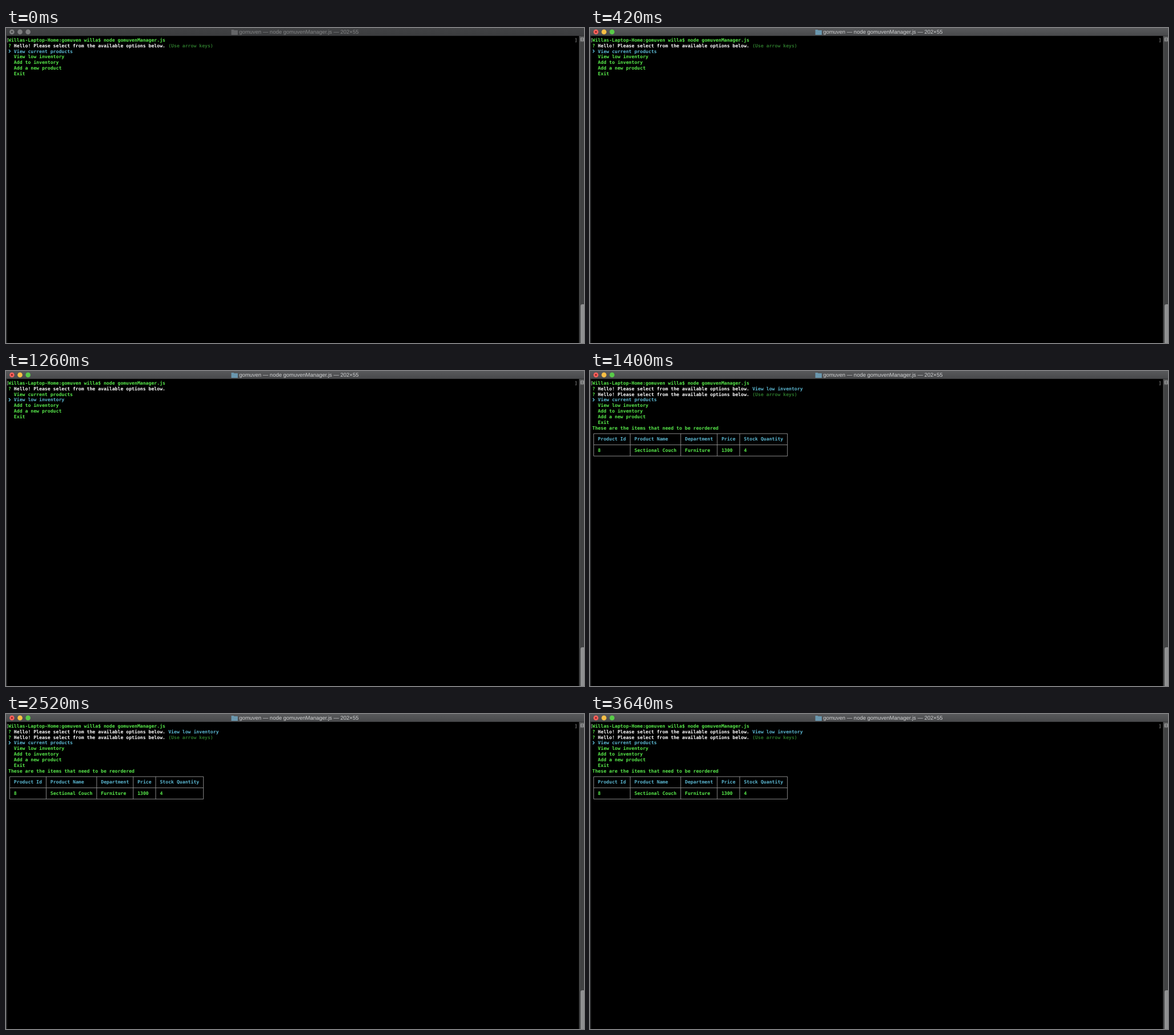
These frames come from a looping animation (1012 by 553 pixels, 3850 ms). An HTML page:

```html
<!DOCTYPE html>
<html lang="en">
<head>
<meta charset="utf-8">
<title>Terminal</title>
<style>
  html, body { margin: 0; width: 100%; height: 100%; overflow: hidden; background: #000; }
  svg {
    display: block; width: 1012px; height: 553px; text-rendering: geometricPrecision;
    --top: #414244; --bottom: #3b3c3e; --title: #858687; --folder: #646567;
    --close: #7d7e7f; --min: #7d7e7f; --zoom: #7d7e7f; --dot: #38393a;
  }
  svg.active {
    --top: #58595b; --bottom: #48494b; --title: #d2d3d4; --folder: #6a97ae;
    --close: #f7605a; --min: #f8bf45; --zoom: #58cb48; --dot: #7c1210;
  }
  #screen text { font: bold 8.166px "DejaVu Sans Mono", monospace; white-space: pre; }
  #title { font: 9.48px "Liberation Sans", Arial, sans-serif; fill: var(--title); }
  .green { fill: #58ea4b; }
  .cyan { fill: #5cb8d2; }
  .white { fill: #fff; }
  .dim { fill: #2b742a; }
  .gray { fill: #777; }
</style>
</head>
<body>
<svg id="window" viewBox="0 0 1012 553">
  <defs>
    <linearGradient id="bar" x2="0" y2="1">
      <stop style="stop-color:var(--top)"/>
      <stop offset="1" style="stop-color:var(--bottom)"/>
    </linearGradient>
  </defs>
  <rect width="1012" height="553"/>
  <rect y="14" width="1.6" height="539" fill="#343536"/>
  <rect width="1012" height="13.8" fill="url(#bar)"/>
  <circle cx="10.4" cy="6.9" r="4.3" style="fill:var(--close)"/>
  <circle cx="10.4" cy="6.9" r="1.4" style="fill:var(--dot)"/>
  <circle cx="24.5" cy="6.9" r="4.3" style="fill:var(--min)"/>
  <circle cx="38.6" cy="6.9" r="4.3" style="fill:var(--zoom)"/>
  <path d="M394.5 3h4l1 1h6.3v8h-11.3z" style="fill:var(--folder)"/>
  <text id="title" x="408.2" y="10.3">gomuven — node gomuvenManager.js — 202×55</text>

  <rect x="1003.6" y="14" width="8.4" height="539" fill="#414243"/>
  <rect x="1003.6" y="14" width="1" height="539" fill="#565758"/>
  <rect x="1004.6" y="14.6" width="7.4" height="10" fill="#58595a"/>
  <path d="M1006.5 17.5h5v5h-5zM1006.5 20h5" fill="none" stroke="#b4b5b6" stroke-width=".8"/>
  <rect x="1006" y="485" width="8" height="72" rx="3" fill="#8f9091"/>
  <g id="screen"></g>
</svg>
<script>
const LOOP = 3850, FOCUS = 420, MOVE = 840, ENTER = 1400;
const colX = col => 4 + col * 4.916;
const rowY = row => 23.9 + row * 9.83;
const options = ['View current products', 'View low inventory', 'Add to inventory', 'Add a new product', 'Exit'];

const put = (row, col, color, str) =>
  `<text class="${color}" x="${colX(col)}" y="${rowY(row)}">${str}</text>`;

const question = (row, color, tail) =>
  put(row, 0, 'green', '?') +
  put(row, 2, 'white', 'Hello! Please select from the available options below.') +
  put(row, 57, color, tail);

const menu = (row, selected) =>
  options.map((name, i) => put(row + i, 2, i === selected ? 'cyan' : 'green', name)).join('') +
  `<path d="M5 ${rowY(row + selected) - 5.6}l2.4 2.7l-2.4 2.7" fill="none" stroke="#5cb8d2" stroke-width="1.4"/>`;

function table(row) {
  const edges = [.5, 13.5, 31.5, 44.5, 52.5, 69.5].map(colX);
  const lines = [0, 2, 4].map(i => rowY(row + i) - 2.4);
  const path = edges.map(x => `M${x} ${lines[0]}V${lines[2]}`).join('') +
    lines.map(y => `M${edges[0]} ${y}H${edges[5]}`).join('');
  const cells = [
    [2, 'Product Id', '8'], [15, 'Product Name', 'Sectional Couch'],
    [33, 'Department', 'Furniture'], [46, 'Price', '1300'], [54, 'Stock Quantity', '4']
  ];
  return `<path d="${path}" fill="none" stroke="#999" stroke-width=".9"/>` +
    cells.map(([col, head, value]) =>
      put(row + 1, col, 'cyan', head) + put(row + 3, col, 'green', value)).join('');
}

const prompt = put(0, -.75, 'gray', '[') + put(0, 201.7, 'gray', ']') +
  put(0, 0, 'green', 'Willas-Laptop-Home:gomuven willa$ node gomuvenManager.js');
const hint = '(Use arrow keys)';
const screens = [
  prompt + question(1, 'dim', hint) + menu(2, 0),
  prompt + question(1, 'dim', '') + menu(2, 1),
  prompt + question(1, 'cyan', options[1]) + question(2, 'dim', hint) + menu(3, 0) +
    put(8, 0, 'green', 'These are the items that need to be reordered') + table(9)
];

const win = document.getElementById('window');
const screenGroup = document.getElementById('screen');
let shown = -1;

function draw() {
  const t = performance.now() % LOOP;
  const step = t < MOVE ? 0 : t < ENTER ? 1 : 2;
  win.classList.toggle('active', t >= FOCUS);
  if (step !== shown) screenGroup.innerHTML = screens[shown = step];
  requestAnimationFrame(draw);
}
draw();
</script>
</body>
</html>
```
